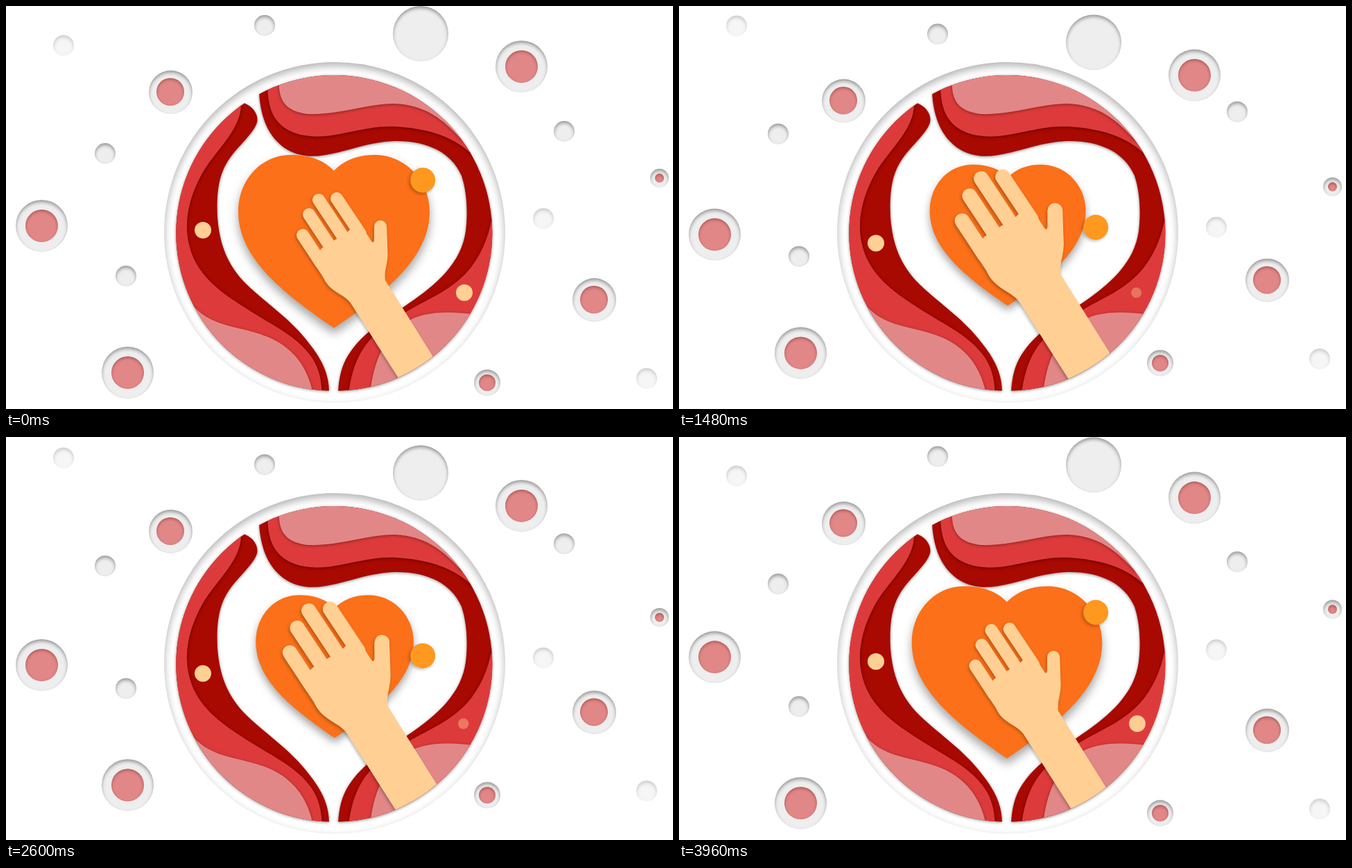
Write an HTML page that moves like this. It is 962x582 px and loops after 4000 ms.

```html
<!DOCTYPE html>
<html lang="en">
<head>
<meta charset="utf-8">
<title>Paper-cut heart</title>
<style>
  html, body { margin: 0; width: 100%; height: 100%; overflow: hidden; background: #fff; }
  #stage { position: relative; width: 962px; height: 582px; overflow: hidden; }
  #stage div { position: absolute; border-radius: 50%; }
  .hole { background: #eee; box-shadow: inset 0 3px 5px rgba(0,0,0,.36); }
  .core { background: #e28787; box-shadow: inset 0 2px 4px rgba(80,0,0,.36); }
  .faint { opacity: .5; }
  #ring { left: 228px; top: 80.5px; width: 492px; height: 492px;
          box-shadow: inset 0 5px 12px rgba(0,0,0,.31); }
  svg { position: absolute; left: 0; top: 0; }
  .dark { fill: #a80900; }
  .mid { fill: #dd3b3b; filter: drop-shadow(0 1px 2px rgba(40,0,0,.55)); }
  .pink { fill: #e28787; filter: drop-shadow(0 1px 2px rgba(60,0,0,.5)); }
  .paper { filter: drop-shadow(0 1px 2.2px rgba(0,0,0,.45)); }
  #heart { fill: #fb7018; filter: drop-shadow(0 8px 7px rgba(0,0,0,.36)); }
  #hand { fill: #ffcf94; stroke: #ffcf94; filter: drop-shadow(-1px 2px 2px rgba(0,0,0,.28)); }
  #ball { fill: #ff981f; filter: drop-shadow(-2px 2px 2px rgba(0,0,0,.25)); }
  .bead { fill: #ffcf94; }
</style>
</head>
<body>
<div id="stage">
  <div id="ring"></div>
  <svg width="962" height="582" viewBox="0 0 962 582">
    <clipPath id="disc"><circle cx="473.3" cy="328" r="228"/></clipPath>

    <g class="paper"><g clip-path="url(#disc)">
      <path class="dark" d="M335 130L345 141C358 146 366 160 361 171C353 190 327 207 314 235C304 257 304 285 305 305C308 344 319 374 347 402C376 430 411 452 437 487C457 512 466 533 466 558L200 560V100Z"/>
      <path class="dark" d="M365 125C367 160 378 190 405 207C450 234 500 197 560 195C605 194 642 210 657 245C667 275 665 310 663 325C657 370 622 402 580 430C540 458 515 472 495 502C483 520 480 540 479 558H760V60H365Z"/>
    </g></g>

    <g clip-path="url(#disc)">
      <path class="mid" d="M339 140C340 178 305 205 284 240C264 275 257 310 263 340C272 387 308 412 342 434C382 460 415 474 437 502C451 520 456 538 456 570H200V100Z"/>
      <path class="mid" d="M377 115C378 145 383 175 425 186C470 196 510 172 560 174C610 177 645 188 674 216L760 60H376Z"/>
      <path class="mid" d="M702 300C698 325 690 352 671 377C645 410 610 422 580 440C525 472 499 500 493 570H760V300Z"/>
      <path class="pink" d="M262 422C290 466 335 460 378 478C420 496 438 528 445 570H200V422Z"/>
      <path class="pink" d="M394 105C392 135 402 152 435 156C480 158 520 141 560 141C605 143 630 163 658 194L760 60H394Z"/>
      <path class="pink" d="M680 446C640 440 600 440 575 458C545 480 528 515 524 570H760V446Z"/>
    </g>

    <circle class="bead" id="leftBead" cx="284" cy="323.7" r="12"/>
    <circle class="bead" id="rightBead" cy="414" r="12"/>

    <path id="heart" d="M473 238C460 224 440 215 411 215C368 215 335 251 335 297C335 363 398 414 473 465C548 414 611 363 611 297C611 251 575 215 532 215C506 215 486 224 473 238Z"/>
    <circle id="ball" cx="601.2" cy="251.5" r="18"/>

    <g clip-path="url(#disc)"><g id="hand">
      <path stroke="none" d="M441 367L455 350L474 338L492 327L508 310L526 338Q531 346 531 335L531 318H549L550.5 358C550.5 374 545 382 547 396L660 577L604 597L497 429C487 415 467 414 457 391Z"/>
      <path fill="none" stroke-width="18" stroke-linecap="round" d="M428 331L455 372M437 301L474 357M451 280L492 342M477 278L511 329M540 318.5L540.5 350"/>
    </g></g>
  </svg>
</div>
<script>
  const LOOP = 4000, STEP = 40;
  const DOWN = 17, UP = -38.3;
  const stage = document.getElementById('stage');
  const byId = id => document.getElementById(id);

  // x, y, radius, core radius, travel, faint
  const bubbles = [
    [82.5, 56.5, 15, 0, UP, true],
    [373, 28.3, 15, 0, DOWN],
    [598, 40, 40, 0, DOWN],
    [743.7, 87.5, 37.5, 23.5, DOWN],
    [237.3, 124, 31.5, 20, DOWN],
    [804.7, 181, 15, 0, UP],
    [142.7, 212.5, 15, 0, UP],
    [942.7, 248.5, 13.5, 6.5, DOWN],
    [51.5, 317, 37.5, 23.5, DOWN],
    [774.7, 307, 15, 0, DOWN, true],
    [173.3, 390.3, 15, 0, UP],
    [848.3, 424.3, 31.5, 20, UP],
    [175.3, 529, 37.5, 23.5, UP],
    [694, 544.3, 19, 12, UP],
    [924, 537.5, 15, 0, UP, true]
  ].map(([x, y, r, core, travel, faint]) => {
    const el = addDisc(stage, 'hole' + (faint ? ' faint' : ''), x, y, r);
    if (core) addDisc(el, 'core', r, r, core);
    return { el, travel };
  });

  function addDisc(parent, className, x, y, r) {
    const el = document.createElement('div');
    el.className = className;
    el.style.cssText = `left:${x - r}px;top:${y - r}px;width:${2 * r}px;height:${2 * r}px`;
    return parent.appendChild(el);
  }

  const scaleAbout = (x, y, s) => `translate(${x} ${y}) scale(${s}) translate(${-x} ${-y})`;

  function draw(now) {
    const t = Math.floor(now / STEP) * STEP % LOOP;
    const p = 1 - Math.abs(1 - 2 * t / LOOP);

    for (const { el, travel } of bubbles) el.style.transform = `translateY(${travel * p}px)`;
    byId('heart').setAttribute('transform', scaleAbout(479.4, 291.3, 1 - .25 * p));
    byId('hand').setAttribute('transform', scaleAbout(528, 437, 1 + .265 * p));
    byId('ball').setAttribute('cy', 251.5 + 92 * p);
    byId('leftBead').setAttribute('cy', 323.7 + 25.5 * p);

    const bead = byId('rightBead');
    bead.setAttribute('cx', 661 - 1.8 * p);
    bead.setAttribute('r', 12 - 6 * p);
    bead.setAttribute('opacity', 1 - .85 * p);
    requestAnimationFrame(draw);
  }
  draw(0);
</script>
</body>
</html>
```
